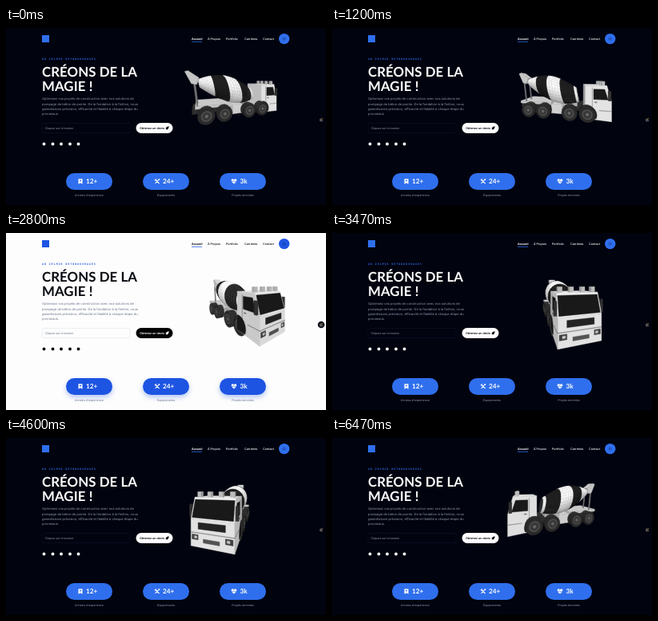
Write an HTML page with a canvas that moves like this. It is 400 by 222 pixels and loops after 6.54 s.

```html
<!DOCTYPE html>
<html lang="fr">
<head>
<meta charset="utf-8">
<title>Créons de la magie</title>
<style>
  html, body { margin: 0; width: 100%; height: 100%; overflow: hidden; }
  body {
    --bg: #01030f; --ink: #fff; --soft: #929bad; --line: #0b1428; --btn: #fff; --btnInk: #05070f;
    --blue: #2f6fed; --badge: #01030f; --glow: transparent;
    background: var(--bg);
  }
  body.light {
    --bg: #fdfdfd; --ink: #06080f; --soft: #69758a; --line: #e6e8ec; --btn: #000; --btnInk: #fff;
    --blue: #1d54e2; --badge: #10131c; --glow: #1d54e255;
  }
  svg, canvas { position: absolute; inset: 0; width: 100vw; height: 100vh; display: block; }
  text { font-family: Inter, sans-serif; fill: var(--ink); text-rendering: geometricPrecision; }
  .title { font: 700 16.8px Lato, sans-serif; letter-spacing: .1px; }
  .brand { font: bold 3.2px "DejaVu Sans Mono", monospace; letter-spacing: 1.03px; fill: var(--blue); }
  .body { font-size: 4.05px; fill: var(--soft); }
  .nav { font-size: 3.7px; font-weight: 500; }
  .small { font-size: 3.6px; fill: var(--soft); }
  .label { font-size: 3.6px; fill: var(--soft); text-anchor: middle; }
  .num { font: 700 8.2px Lato, sans-serif; fill: #fff; }
  .blue { fill: var(--blue); }
  .ink { fill: var(--ink); }
  .pill { fill: var(--blue); filter: drop-shadow(0 3px 3px var(--glow)); }
  .icon { fill: none; stroke: #fff; stroke-width: 1.1; }
</style>
</head>
<body>
<svg viewBox="0 0 400 222">
  <rect class="blue" x="45" y="9" width="9" height="9"/>
  <g class="nav">
    <text x="232" y="14.9" font-weight="700">Accueil</text>
    <text x="252" y="14.9">À Propos</text>
    <text x="275" y="14.9">Portfolio</text>
    <text x="298" y="14.9">Carrières</text>
    <text x="321" y="14.9">Contact</text>
  </g>
  <rect class="blue" x="232" y="16.8" width="13" height=".8"/>
  <circle class="blue" cx="347.7" cy="13.6" r="6.7"/>
  <circle cx="347.7" cy="13.6" r="1.5" fill="none" stroke="#12327e" stroke-width=".7"/>

  <text class="brand" x="45" y="39.9">AB ZELMIR BETONOUVRAGES</text>
  <text class="title" x="45" y="60.5">CRÉONS DE LA</text>
  <text class="title" x="45" y="78.9">MAGIE !</text>
  <text class="body" x="45" y="90.3">Optimisez vos projets de construction avec nos solutions de</text>
  <text class="body" x="45" y="96.7">pompage de béton de pointe. De la fondation à la finition, nous</text>
  <text class="body" x="45" y="103">garantissons précision, efficacité et fiabilité à chaque étape du</text>
  <text class="body" x="45" y="109.3">processus.</text>

  <rect x="45" y="119.5" width="110" height="12" rx="2" fill="none" stroke="var(--line)" stroke-width=".7"/>
  <text class="small" x="48.5" y="126.8">Cliquez sur le bouton</text>
  <rect x="162.5" y="119" width="46" height="13" rx="6.5" fill="var(--btn)"/>
  <text x="167" y="126.8" style="font-size:3.7px;font-weight:600;fill:var(--btnInk)">Obtenez un devis</text>
  <path d="M203.6 123.2q-2.2 0-3.2 1.6l-1 .3.7.8-.5 1.6 1.6-.5.8.7.3-1q1.5-1.2 1.3-3.5Z" fill="var(--btnInk)"/>

  <g class="ink">
    <circle cx="47.5" cy="145.5" r="1.9"/><circle cx="58.5" cy="145.5" r="1.9"/>
    <circle cx="69" cy="145.5" r="1.9"/><circle cx="80" cy="145.5" r="1.9"/>
    <circle cx="90.5" cy="145.5" r="1.9"/>
  </g>

  <rect class="pill" x="75" y="182" width="58" height="21" rx="10.5"/>
  <path d="M90.5 189.2h5v6.6l-2.5-1.6-2.5 1.6Z" fill="#fff"/>
  <circle class="blue" cx="93" cy="191.5" r="1"/>
  <text class="num" x="100" y="195.4">12+</text>
  <text class="label" x="104" y="211.2">Années d'expérience</text>

  <rect class="pill" x="171" y="182" width="58" height="21" rx="10.5"/>
  <path class="icon" d="M186.5 190l5 5m0-5.4-5 5.4m-.6-3.9 1.9-1.8m3-.1 1.4 1.5"/>
  <text class="num" x="196" y="195.4">24+</text>
  <text class="label" x="200" y="211.2">Équipements</text>

  <rect class="pill" x="267" y="182" width="58" height="21" rx="10.5"/>
  <path d="M285 195.6c-6-4.4-2.5-8.2 0-5.4 2.5-2.8 6 1 0 5.4Z" fill="#fff"/>
  <path d="M281 192.5h2.6l1-1.3 1.2 2.2.7-.9h2.6" fill="none" stroke="var(--blue)" stroke-width=".6"/>
  <text class="num" x="292.5" y="195.4">3k</text>
  <text class="label" x="296" y="211.2">Projets terminés</text>

  <circle cx="394" cy="115" r="4.3" fill="var(--badge)"/>
  <path d="M395 114.2h-2.2v2.4h2.6v-1" fill="none" stroke="#c9c9c9" stroke-width=".6"/>
  <path d="M394 115.3l2-2" stroke="#e0a040" stroke-width=".8"/>
</svg>
<canvas id="stage"></canvas>
<script>
const LOOP = 6540, DIST = 110, CX = 284, CY = 66;
const stage = document.getElementById('stage'), g = stage.getContext('2d');
const ratio = devicePixelRatio || 1;
stage.width = 400 * ratio;
stage.height = 222 * ratio;

// Model points are [along, down, side]; the truck's front is at positive "along".
const parts = [];
const mean = pts => [0, 1, 2].map(i => pts.reduce((s, p) => s + p[i], 0) / pts.length);

function add(layer, faces, at) {
  const center = mean(faces.flatMap(f => f.pts));
  parts.push({ layer, faces, center, at: at || center });
}
function prism(layer, shape, v0, v1, tone, at, decals = []) {
  const cap = v => shape.map(([u, h]) => [u, h, v]);
  const a = cap(v0), b = cap(v1), n = shape.length;
  const faces = a.map((p, i) => ({ pts: [p, a[(i + 1) % n], b[(i + 1) % n], b[i]], tone }));
  faces.push({ pts: a, tone }, { pts: b, tone }, ...decals);
  add(layer, faces, at);
}
const rect = (u0, u1, h0, h1) => [[u0, h0], [u1, h0], [u1, h1], [u0, h1]];
const disc = (u, h, r, n = 18) => Array.from({ length: n }, (_, i) => {
  const a = i / n * 2 * Math.PI;
  return [u + r * Math.cos(a), h + r * Math.sin(a)];
});

function buildChassis() {
  prism(1, rect(-46, 31, 27, 33), -9, 9, 50);
  prism(1, rect(-6, 6, 26, 36), -14, 14, 225);
  prism(1, rect(-43, -6, 24, 26.5), -15, 15, 215);
  prism(1, rect(6, 22, 24, 26.5), -15, 15, 190);
  for (const v of [-6, 6]) prism(1, [[-45, 2], [-44, 2], [-41, 26], [-42, 26]], v - 0.5, v + 0.5, 130);
  prism(2, [[-53, -9], [-50, -10], [-40, -3], [-42, 4], [-47, 3]], -5, 5, 215);
}

function buildWheels() {
  for (const u of [32, 14, -15, -33]) for (const s of [-1, 1]) {
    const flat = (r, tone) => ({ pts: disc(u, 34, r).map(p => [...p, s * 16.05]), tone });
    prism('side', disc(u, 34, 8), s * 9, s * 16, 46, null, [flat(5, 85), flat(3.6, 58), flat(1.5, 110)]);
  }
}

// Spiral bands: each ring is sheared along the axis so that the stripes lean.
function buildDrum() {
  const start = -40, step = 3, rows = 21, cols = 28, faces = [];
  const point = (t, j) => {
    const a = j / cols * 2 * Math.PI;
    const r = 16 * (1 - 0.78 * Math.abs((t + 5) / 36) ** 1.8);
    return [t + 0.2 * r * Math.cos(a), 10 + 0.22 * (t + 8) + r * Math.cos(a), r * Math.sin(a)];
  };
  const ring = t => Array.from({ length: cols }, (_, j) => point(t, j));
  for (let i = 0; i < rows; i++) for (let j = 0; j < cols; j++) {
    const t = start + i * step;
    faces.push({
      pts: [point(t, j), point(t + step, j), point(t + step, j + 1), point(t, j + 1)],
      tone: Math.floor(i / 5) % 2 ? 34 : 250
    });
  }
  faces.push({ pts: ring(start), tone: 50 }, { pts: ring(start + rows * step), tone: 50 });
  add(2, faces);
}

function buildCab() {
  const at = [42, 20, 0], w = 16, decals = [];
  const nose = h => (h < 20 ? 50 + 4 * (h - 5) / 15 : 54) + 0.1;
  const front = (h0, h1, v0, v1, tone) => decals.push({
    pts: [[nose(h0), h0, v0], [nose(h0), h0, v1], [nose(h1), h1, v1], [nose(h1), h1, v0]], tone
  });
  front(6.5, 19, -w + 0.8, w - 0.8, 26);
  front(22, 26.5, -10, 10, 38);
  front(29, 29.4, -w, w, 150);
  front(33, 35.5, -6, 6, 90);
  for (const s of [-1, 1]) {
    front(30.5, 34, s * 10, s * 15, 70);
    front(31.5, 33, s * 11, s * 13, 215);
    const side = (shape, tone) => decals.push({ pts: shape.map(p => [...p, s * (w + 0.1)]), tone });
    side([[38, 8.5], [48, 8.5], [51, 18.5], [38, 18.5]], 28);
    side(rect(36.6, 36.9, 7, 27), 165);
    side(rect(39, 41, 21, 21.6), 100);
    side(rect(43, 54, 29, 29.4), 160);
    side(disc(32, 34, 9).map(([u, h]) => [Math.max(u, 30), Math.min(h, 38)]), 30);
  }
  prism(2, [[30, 5], [50, 5], [54, 20], [54, 39], [30, 38]], -w, w, 245, at, decals);
  for (const v of [-13, -4.5, 4.5, 13])
    prism(2, rect(46, 48.5, 1, 4.6), v - 1.6, v + 1.6, 205, at);
  for (const s of [-1, 1])
    prism('side', rect(51, 53, 10, 19), s * (w + 0.3), s * (w + 2), 55, at);
}

buildChassis();
buildWheels();
buildDrum();
buildCab();

function drawFace({ pts, tone }, center, view) {
  const p = pts.map(view), [a, b] = p, c = p[Math.max(2, p.length >> 1)], m = view(center);
  const e = a.map((x, i) => b[i] - x), f = a.map((x, i) => c[i] - x);
  let n = [e[1] * f[2] - e[2] * f[1], e[2] * f[0] - e[0] * f[2], e[0] * f[1] - e[1] * f[0]];
  const dot = q => n[0] * q[0] + n[1] * q[1] + n[2] * q[2];
  const out = dot(a.map((x, i) => x - m[i])) < 0 ? -1 : 1;
  const size = out * Math.hypot(...n) || 1;
  n = n.map(x => x / size);
  if (dot([-a[0], -a[1], DIST - a[2]]) <= 0) return;
  const light = Math.min(1, 0.68 + 0.25 * n[2] - 0.25 * n[1]);
  const l = Math.round(tone * light);
  g.fillStyle = g.strokeStyle = `rgb(${l},${l},${l})`;
  g.beginPath();
  for (const [x, y, z] of p) {
    const k = DIST / (DIST - z);
    g.lineTo(CX + x * k, CY + y * k);
  }
  g.closePath();
  g.fill();
  g.stroke();
}

function drawTruck(angle) {
  const c = Math.cos(angle), s = Math.sin(angle);
  const view = ([u, h, v]) => [u * c - v * s, h, u * s + v * c];
  const order = parts.map(part => {
    const [x, y, z] = view(part.at);
    const layer = part.layer === 'side' ? (part.center[2] * c < 0 ? 0 : 2) : part.layer;
    return { part, layer, far: layer === 1 ? 0 : Math.hypot(x, y, DIST - z) };
  }).sort((a, b) => a.layer - b.layer || b.far - a.far);
  for (const { part } of order)
    for (const face of part.faces) drawFace(face, part.center, view);
}

function frame(now) {
  const t = now % LOOP;
  document.body.classList.toggle('light', t >= 1700 && t < 3070);
  g.setTransform(stage.width / 400, 0, 0, stage.height / 222, 0, 0);
  g.clearRect(0, 0, 400, 222);
  g.lineWidth = 0.4;
  g.lineJoin = 'round';
  drawTruck((-21 + 0.0275 * t) * Math.PI / 180);
  requestAnimationFrame(frame);
}
requestAnimationFrame(frame);
</script>
</body>
</html>
```
